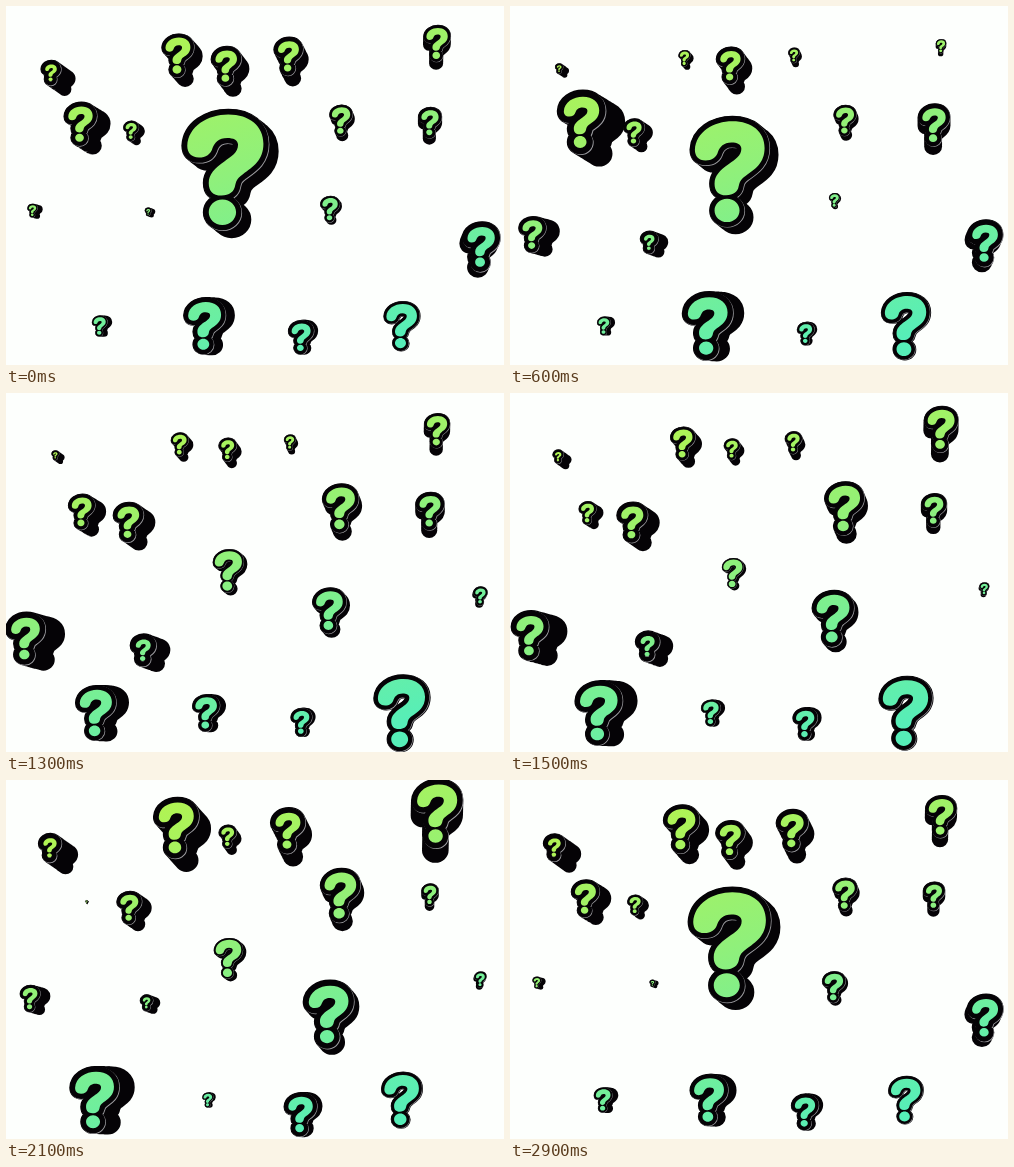
An HTML page for the animation above (3 s loop, 498 by 359 pixels).

```html
<!DOCTYPE html>
<html lang="en">
<head>
<meta charset="utf-8">
<title>Question marks</title>
<style>
html, body { margin: 0; width: 100%; height: 100%; overflow: hidden; background: #fdfffd; }
svg { display: block; }
path { stroke-linejoin: round; }
</style>
</head>
<body>
<svg id="stage" width="498" height="359" viewBox="0 0 498 359">
  <defs>
    <linearGradient id="tint" gradientUnits="userSpaceOnUse" x1="16.5" y1="55" x2="124" y2="413">
      <stop offset="0" stop-color="#b3f450"/>
      <stop offset=".44" stop-color="#90f07a"/>
      <stop offset="1" stop-color="#56eeb8"/>
    </linearGradient>
  </defs>
</svg>
<script>
const LOOP = 3000, STEP = 100;
const INK = '#050306', SHINE = '#9c9ca0', TINT = 'url(#tint)';
const EDGE = 3.7;                          // outline width at scale 1
const VANISH = { x: 425, y: 333 }, DEPTH = .029;
const WIDE = 2 / 3, CALM = 1 / 3;          // how far a mark swings around scale 1

// Question mark, 113 units high, centred on 0,0
const GLYPH_H = 113;
const GLYPH =
  'M-39,-24 C-38,-44 -18,-56 3,-56 C25,-56 39,-44 39,-26 C39,-9 28,-2 18,5 ' +
  'C11,10 11,13 10,17 C9,23 4,27 -4,27 C-13,27 -17,22 -17,14 C-17,5 -11,-1 -1,-8 ' +
  'C6,-13 13,-17 13,-25 C13,-30 8,-32 2,-32 C-7,-32 -11,-27 -13,-22 ' +
  'C-15,-15 -20,-12 -27,-12 C-35,-12 -39,-17 -39,-24Z ' +
  'M-17,44 C-17,37 -11,31 -3,31 C5,31 11,37 11,44 C11,51 5,57 -3,57 C-11,57 -17,51 -17,44Z ';

const stage = document.getElementById('stage');
const marks = [];

function addPath(color) {
  const p = document.createElementNS('http://www.w3.org/2000/svg', 'path');
  p.setAttribute('fill', color);
  if (color !== TINT) p.setAttribute('stroke', color);
  return stage.appendChild(p);
}

// Rows lean less the lower they lie; a mark grows out of the nearest row
function nearestRow(x, y) {
  const lines = [62, 125, 191, 320].map(r => r - (320 - r) * .00018 * x);
  return lines.reduce((a, b) => Math.abs(b - y) < Math.abs(a - y) ? b : a);
}

function mark(x, y, face, phase, swing = WIDE) {
  marks.push({
    x, y, face, swing,
    phase: phase * Math.PI / 180,
    row: nearestRow(x, y),
    dx: (VANISH.x - x) * DEPTH,
    dy: (VANISH.y - y) * DEPTH,
    layers: [INK, SHINE, INK, TINT].map(addPath)
  });
}

mark(52, 69, 13, 296);
mark(176, 54, 32, 281);
mark(224, 62, 24, 25, CALM);
mark(285, 54, 24, 293);
mark(431, 41, 35, 260);

mark(81, 122, 27, 70, .9);
mark(128, 130, 24, 177, CALM);
mark(336, 118, 36, 218, CALM);
mark(424, 120, 26, 97, CALM);

mark(29, 225, 25, 149);
mark(144, 231, 13, 148);
mark(224, 174, 69, 26);
mark(325, 216, 35, 237);
mark(474, 220, 25, 29);

mark(96, 320, 36, 220);
mark(203, 320, 35, 57);
mark(297, 331, 27, 273, CALM);
mark(396, 320, 55, 141, .25);

const glyphAt = (x, y, k) => GLYPH.replace(/(-?\d+),(-?\d+)/g,
  (_, px, py) => (x + px * k).toFixed(2) + ',' + (y + py * k).toFixed(2));

function setPath(path, d, width) {
  path.setAttribute('d', d);
  path.setAttribute('stroke-width', width.toFixed(2));
}

function drawMark(m, angle) {
  const scale = 1 + m.swing * Math.cos(angle - m.phase);
  const dx = m.dx * scale, dy = m.dy * scale;
  const x = m.x - dx / 2;
  const y = m.row + (m.y - m.row) * scale - dy / 2;
  const k = m.face * scale / GLYPH_H;
  const line = 2 * EDGE * scale;
  const lit = .45 * scale;
  const [body, shine, rim, front] = m.layers;

  // Sweep the outline from the face to the back
  const n = Math.ceil(Math.hypot(dx, dy) / 2) + 1;
  let sweep = '';
  for (let i = 0; i <= n; i++) sweep += glyphAt(x + dx * i / n, y + dy * i / n, k);
  setPath(body, sweep, line);

  const d = glyphAt(x, y, k);
  setPath(shine, glyphAt(x + lit, y + lit, k), line * .9);
  setPath(rim, d, line * .9);
  setPath(front, d, 0);
}

function render(ms) {
  const t = Math.floor(ms / STEP) * STEP % LOOP;
  marks.forEach(m => drawMark(m, t / LOOP * 2 * Math.PI));
}

const start = performance.now();
function tick() {
  render(performance.now() - start);
  requestAnimationFrame(tick);
}
tick();
</script>
</body>
</html>
```
